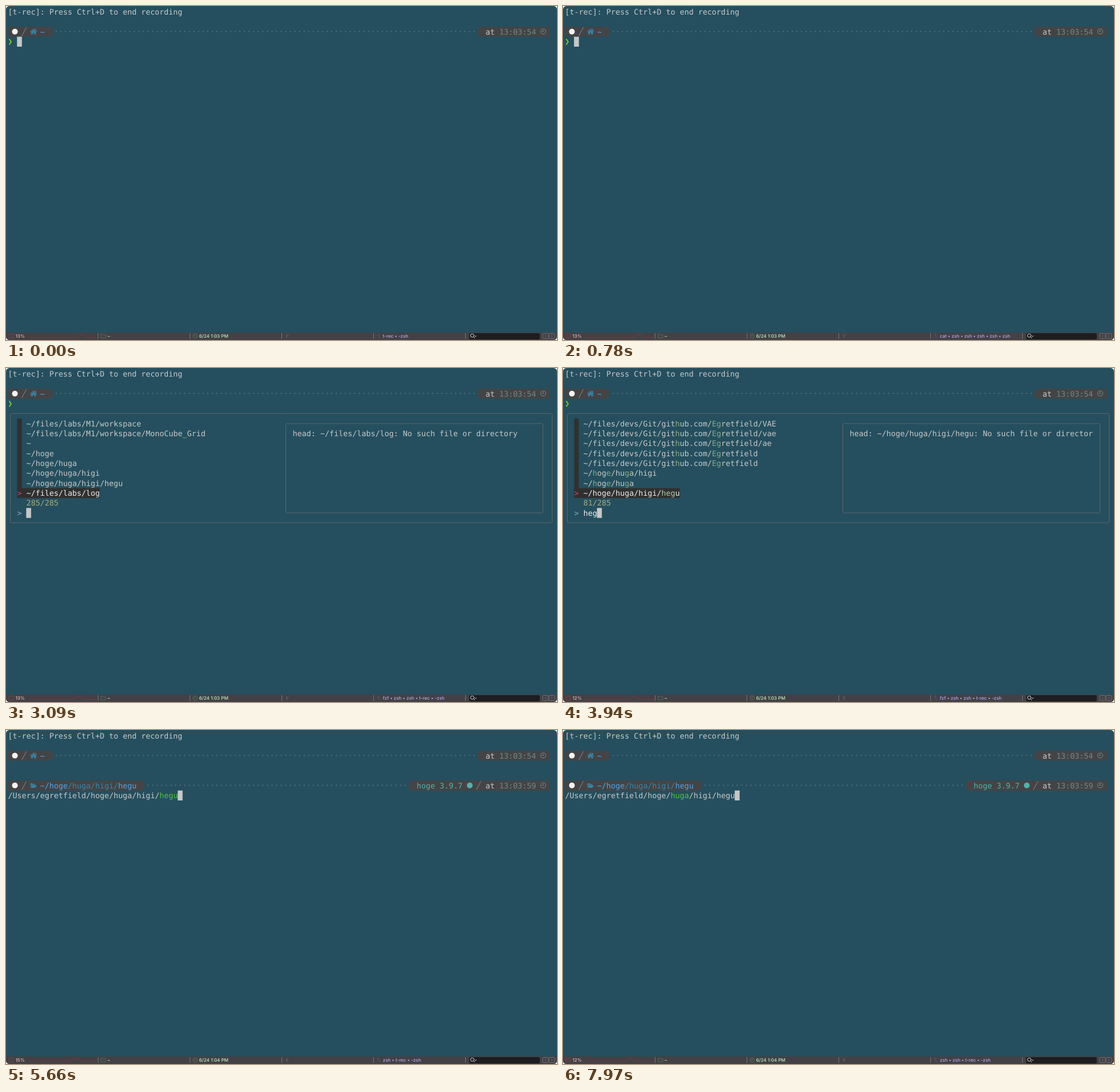
An HTML page with a canvas for the animation above (8 s loop, 960 by 583 pixels).

```html
<!DOCTYPE html>
<html lang="en">
<head>
<meta charset="utf-8">
<title>Directory jump in a terminal</title>
<style>
  html, body { margin: 0; width: 100%; height: 100%; overflow: hidden; background: #fff; }
  canvas { display: block; }
</style>
</head>
<body>
<canvas id="stage" width="960" height="583"></canvas>
<script>
const g = document.getElementById('stage').getContext('2d');
g.textRendering = 'geometricPrecision';
const LOOP = 8000, CELL = 8, LINE = 17.34;
const MONO = '13.29px "DejaVu Sans Mono", monospace';
const UI = '500 8px Inter, sans-serif';
const FG = '#c8c9c9', PILL = '#444446', TEAL = '#4fb3ac', BLUE = '#4fa6ea', DIM_BLUE = '#3487ad';

const col = c => 3.5 + c * CELL;
const row = r => 1.6 + r * LINE;

// Value of the last [time, value] pair already reached
const pick = (t, steps) => steps.filter(s => t >= s[0]).pop()[1];

const QUERY = [[0, ''], [3380, 'h'], [3660, 'he'], [3940, 'heg']];
const COUNT = { '': 285, h: 214, he: 163, heg: 81 };
const CPU = [[0, 13], [3940, 12], [5080, 15], [7390, 12]];
const CLOCK = [[0, '6/24 1:03 PM'], [5080, '6/24 1:04 PM']];
const JOBS = [
  [0, 't-rec • -zsh'],
  [780, 'cat • zsh • zsh • zsh • zsh • zsh'],
  [1640, 'zsh • t-rec • -zsh'],
  [2800, 'fzf • zsh • zsh • t-rec • -zsh'],
  [5080, 'zsh • t-rec • -zsh'],
  [6240, 'zsh • zsh • t-rec • -zsh']
];
const CHOSEN = [[0, 'hegu'], [6520, 'higi'], [7390, 'huga']];

const REPO = '~/files/devs/Git/github.com/Egretfield';
const RECENT = ['~/files/labs/M1/workspace', '~/files/labs/M1/workspace/MonoCube_Grid', '~',
  '~/hoge', '~/hoge/huga', '~/hoge/huga/higi', '~/hoge/huga/higi/hegu', '~/files/labs/log'];
const FOUND = [REPO + '/VAE', REPO + '/vae', REPO + '/ae', REPO, REPO,
  '~/hoge/huga/higi', '~/hoge/huga', '~/hoge/huga/higi/hegu'];

function text(s, c, r, color = FG) {
  g.font = MONO;
  g.fillStyle = color;
  g.fillText(s, col(c), row(r) + 13.3);
}

function label(s, x, color) {
  g.font = UI;
  g.fillStyle = color;
  g.fillText(s, x, 579);
}

function rect(x, y, w, h, color) {
  g.fillStyle = color;
  g.fillRect(x, y, w, h);
}

function stroke(d, color, width = 1) {
  g.strokeStyle = color;
  g.lineWidth = width;
  g.stroke(new Path2D(d));
}

function fill(d, color) {
  g.fillStyle = color;
  g.fill(new Path2D(d));
}

function disc(x, y, r, color) {
  g.beginPath();
  g.arc(x, y, r, 0, 7);
  g.fillStyle = color;
  g.fill();
}

function clockIcon(x, y, r, color) {
  g.beginPath();
  g.arc(x, y, r, 0, 7);
  g.strokeStyle = color;
  g.lineWidth = r / 4;
  g.stroke();
  stroke(`M${x} ${y - r * .6}V${y}h${-r * .5}`, color, r / 4);
}

function box(x, y, w, h, radius, color, solid) {
  g.beginPath();
  g.roundRect(x, y, w, h, radius);
  g.lineWidth = 1;
  g.fillStyle = g.strokeStyle = color;
  solid ? g.fill() : g.stroke();
}

const cursor = (c, r) => rect(col(c) - .3, row(r), CELL + .5, LINE, '#c7c7c7');
const slash = (x, r) => stroke(`M${x} ${row(r) + 16}l8 -15`, '#8a8a8a');

function chevron(r) {
  const y = row(r) + 8.8;
  stroke(`M5.5 ${y - 5}l3.5 5l-3.5 5`, '#76d823', 1.8);
}

// Pills at both ends of a prompt, joined by dots from column a to b
function promptLine(r, a, b, time) {
  const y = row(r), mid = y + LINE / 2, left = col(0), right = col(118);
  const end = col(a) - 1.5, start = col(b + 1) + 1.5;
  box(left, y, end - left, LINE, [0, 8, 8, 0], PILL, true);
  box(start, y, right - start, LINE, [8, 0, 0, 8], PILL, true);
  for (let c = a; c <= b; c++) disc(col(c) + 4, mid - .5, .85, '#718087');
  disc(15.5, mid - .2, 5, '#f4f4f4');
  slash(27.5, r);
  text('at', 104, r);
  text(time, 107, r, '#6c8986');
  clockIcon(936, mid - .5, 4.4, '#6c8986');
}

function firstPrompt() {
  promptLine(2, 10, 101, '13:03:54');
  fill('M42 44.8l6-5.3 2.5 2.2v-1.6h1.8v3.2l1.7 1.5-.8.9-5.2-4.6-5.2 4.6zM43.8 45.6l4.2-3.7 4.2 3.7v3.9h-3v-3h-2.4v3h-3z', DIM_BLUE);
  text('~', 7, 2, BLUE);
}

function secondPrompt() {
  promptLine(5, 30, 86, '13:03:59');
  fill('M42.5 93h3.5l1 1.2h4v1.6h-6.5l-2 4zM45 96.5h8.5l-2.2 4.2h-8.5z', DIM_BLUE);
  text('~/', 7, 5, BLUE);
  text('hoge', 9, 5, BLUE);
  text('/huga/higi/', 13, 5, DIM_BLUE);
  text('hegu', 24, 5, BLUE);
  text('hoge 3.9.7', 89, 5, TEAL);
  disc(808, 96.8, 5, TEAL);
  slash(819.5, 5);
}

// Positions of the query letters: a whole run if there is one, else in order
function matches(path, query) {
  const s = path.toLowerCase(), run = s.indexOf(query);
  let from = run < 0 ? 0 : run;
  return [...query].map(ch => {
    const i = s.indexOf(ch, from);
    from = i + 1;
    return i;
  });
}

function finder(t) {
  const query = pick(t, QUERY), list = query ? FOUND : RECENT, chosen = list[7];
  box(7.5, 79.5, 944, 190.5, 2, '#5f646b');
  box(487.5, 97, 448, 156, 2, '#5f646b');
  rect(col(2), row(5), CELL, LINE * 8, '#303030');
  rect(col(2), row(12), CELL * (2 + chosen.length), LINE, '#303030');
  list.forEach((path, i) => {
    const hits = matches(path, query), current = i === 7;
    [...path].forEach((ch, k) => {
      const hit = hits.includes(k);
      text(ch, 4 + k, 5 + i, current ? (hit ? '#a9cfa0' : '#eeeeee') : (hit ? '#83ad83' : FG));
    });
  });
  text('>', 2, 12, '#d94860');
  text(COUNT[query] + '/285', 4, 13, '#a9ad82');
  text('>', 2, 14, '#85aabd');
  text(query, 4, 14, '#eeeeee');
  cursor(4 + query.length, 14);
  text(`head: ${chosen}: No such file or directory`.slice(0, 53), 62, 6);
}

function chooser(t) {
  const dirs = ['/Users', '/egretfield', '/hoge', '/huga', '/higi', '/hegu'];
  const chosen = pick(t, CHOSEN);
  let c = 0;
  for (const dir of dirs) {
    text('/', c, 6);
    text(dir.slice(1), c + 1, 6, dir === '/' + chosen ? '#4cc63d' : FG);
    c += dir.length;
  }
  cursor(c, 6);
}

function statusBar(t) {
  rect(0, 570, 960, 13, '#434146');
  for (let x = 160.5; x < 810; x += 160) stroke(`M${x} 571v10`, '#77757a');

  box(5.5, 572.5, 7, 7, 1, '#84413f');
  label(pick(t, CPU) + '%', 16.5, '#e5bcb9');
  const peak = 124 - Math.floor(t / 288) * .63;
  stroke(`M40 578.3H${peak}l2-1 3-4.5 2 1 1 2 3-3 2 .5 3 4.5 2 .5H158`, '#793c40', .9);

  stroke('M165.5 573h3l1 1.2h4.5v5h-8.5z', '#587359', .9);
  label('~', 176.5, '#b9e7bb');
  clockIcon(329.5, 576, 3.8, '#587359');
  label(pick(t, CLOCK), 336.5, '#bdf0c1');
  stroke('M489 572.5v7M489 577q3-1 3-3.5', '#68676d', .9);
  stroke('M646.5 573h3.5v6h3M648 573v4', '#5c5269', .9);
  label(pick(t, JOBS), 656.5, '#c0a5e9');

  box(807, 571, 123, 11, 2, '#1e1d1f', true);
  g.beginPath();
  g.arc(812.3, 575.3, 3, 0, 7);
  g.strokeStyle = '#dddddd';
  g.lineWidth = 1;
  g.stroke();
  stroke('M814.5 577.5l2.5 2.5M816.5 575.5l1.7 1.5 1.7-1.5', '#dddddd');
  box(935, 571.5, 10, 9, 2, '#727075');
  box(946, 571.5, 10, 9, 2, '#727075');
  stroke('M941 574l-2 2 2 2M950 574l2 2-2 2', '#727075', .9);
}

function draw(t) {
  g.clearRect(0, 0, 960, 583);
  g.save();
  g.beginPath();
  g.roundRect(0, 0, 960, 583, 6);
  g.clip();
  rect(0, 0, 960, 583, '#254f5e');
  text('[t-rec]: Press Ctrl+D to end recording', 0, 0);
  firstPrompt();
  if (t < 4520) {
    chevron(3);
    if (t < 2800) cursor(2, 3);
    else finder(t);
  } else {
    secondPrompt();
    if (t < 5370) {
      chevron(6);
      cursor(2, 6);
    } else chooser(t);
  }
  statusBar(t);
  g.restore();
}

const begin = performance.now();
function tick() {
  draw((performance.now() - begin) % LOOP);
  requestAnimationFrame(tick);
}
tick();
</script>
</body>
</html>
```
